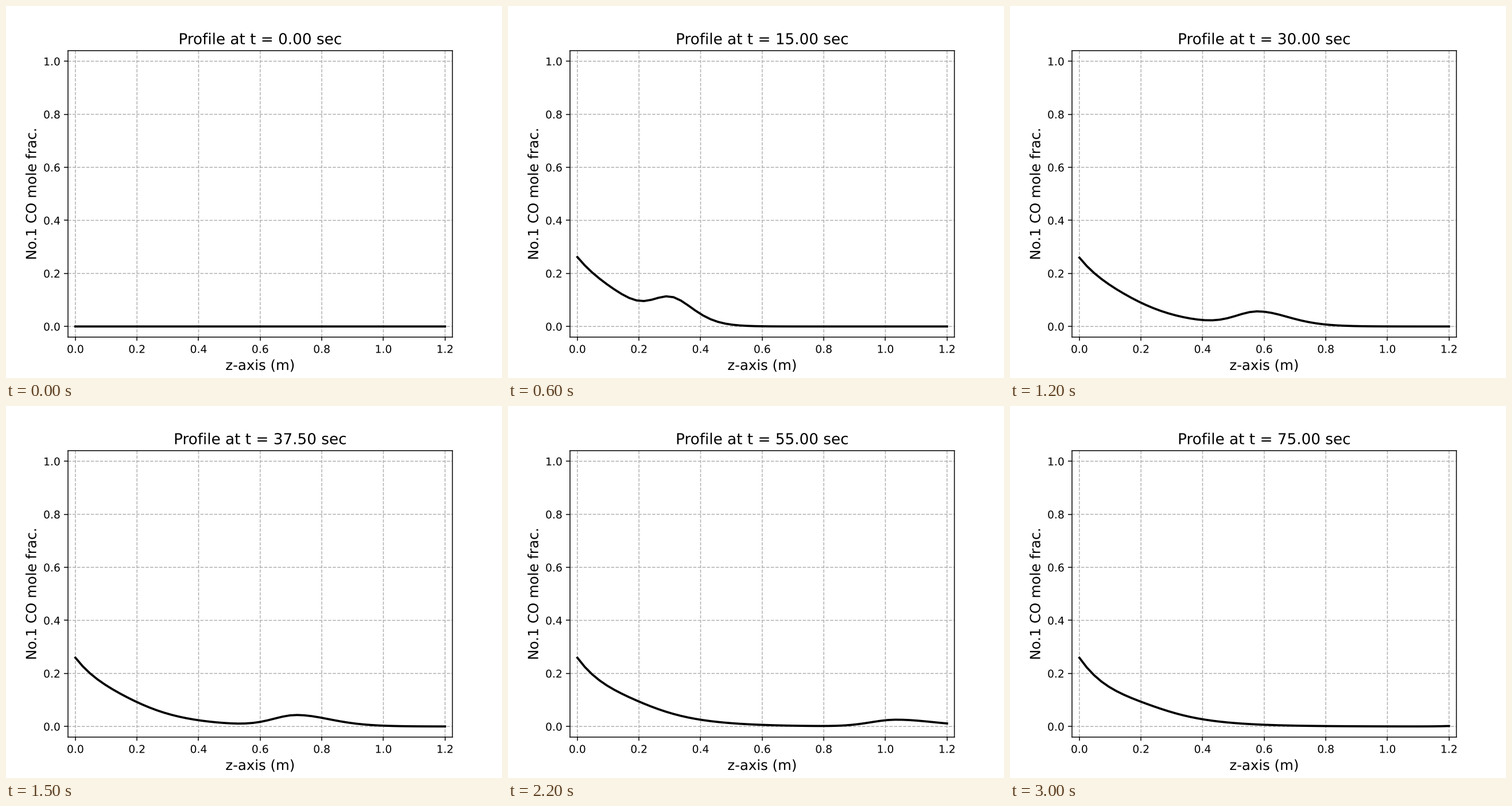
Recreate the animation shown at these times as a matplotlib script. Size 864 by 648 pixels, loop 3100 ms.

```python
import math

import numpy as np
import matplotlib.pyplot as plt
from matplotlib.animation import FuncAnimation
from matplotlib.patheffects import Normal

FRAMES, INTERVAL, DT = 31, 100, 2.5
LENGTH, NODES = 1.2, 51
z = np.linspace(0, LENGTH, NODES)
erf = np.vectorize(math.erf)


def inlet_profile(t):
    """Exponential decay whose rate has a Gaussian dip that drifts inward."""
    late = (max(t - 25, 0) / 50) ** 0.7
    center, depth, width = 0.06 + 0.095 * late, 2.15 + 0.65 * late, 0.133
    dip = erf((z - center) / width) + math.erf(center / width)
    decay = 7.2 * z - depth * width * math.sqrt(math.pi) / 2 * dip
    return (0.259 + 0.012 * math.exp(-t / 10)) * np.exp(-decay)


def mole_fraction(t):
    """Inlet profile followed by a crest that travels, flattens and widens."""
    if t == 0:
        return np.zeros_like(z)
    crest = t * (0.0198 - 0.000018 * t)
    height = (1.71 + 0.0826 * t + 0.3 * math.exp(-t / 5)) ** -2
    lead = 0.1445 * (t / 15) ** 0.37
    trail = 0.065 * (t / 15) ** 0.18

    ahead = height * np.cosh((z - crest) / lead) ** -3.5
    base = inlet_profile(t)
    blend = np.exp(-0.5 * ((z - crest) / trail) ** 2)
    blend *= 1 - np.clip(1 - z / crest, 0, 1) ** 4
    behind = base + (height - base) * blend
    return np.where(z > crest, ahead, behind)


# Path effects draw text as outlines, so nothing is rounded to whole pixels
plt.rcParams.update({
    "font.family": "DejaVu Sans",
    "text.hinting": "none",
    "path.snap": False,
    "path.effects": [Normal()],
})

fig, ax = plt.subplots(figsize=(6.4, 4.8), dpi=135)
fig.subplots_adjust(left=0.125, right=0.9, bottom=0.11, top=0.88)
ax.set_xlim(-0.02 * LENGTH, 1.02 * LENGTH)
ax.set_ylim(-0.04, 1.04)
ax.set_xlabel("z-axis (m)", fontsize=13)
ax.set_ylabel("No.1 CO mole frac.", fontsize=13)
ax.grid(linestyle="--")
title = ax.set_title("", fontsize=14)
line, = ax.plot(z, np.zeros_like(z), color="black", linewidth=2)


def update(i):
    t = i * DT
    line.set_ydata(mole_fraction(t))
    title.set_text(f"Profile at t = {t:.2f} sec")
    return line, title


def init():
    return update(0)


anim = FuncAnimation(fig, update, frames=FRAMES, init_func=init,
                     interval=INTERVAL, repeat=True, repeat_delay=0)
plt.show()
```
